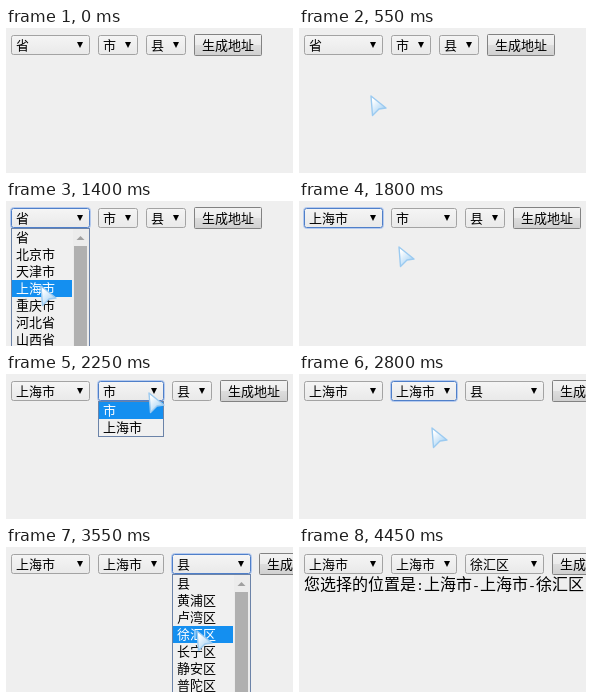
An HTML page for the animation above (4800 ms loop, 287 by 145 pixels).

```html
<!DOCTYPE html>
<html lang="zh-CN">
<head>
<meta charset="utf-8">
<style>
html, body { margin: 0; width: 100%; height: 100%; overflow: hidden; background: #efefef; }
svg { display: block; }
text { font: 13px "Noto Sans CJK SC", "Noto Sans CJK", sans-serif; }
.result { font-size: 16px; }
.half { font: 13.333px "Liberation Mono", monospace; }
</style>
</head>
<body>
<svg width="287" height="145" viewBox="0 0 287 145">
  <defs>
    <linearGradient id="field" x2="0" y2="1">
      <stop stop-color="#f5f5f5"/><stop offset="1" stop-color="#e9e9e9"/>
    </linearGradient>
    <linearGradient id="button" x2="0" y2="1">
      <stop stop-color="#f3f3f3"/><stop offset=".5" stop-color="#ebebeb"/>
      <stop offset=".5" stop-color="#dedede"/><stop offset="1" stop-color="#cfcfcf"/>
    </linearGradient>
    <linearGradient id="pointer" x2=".8" y2="1">
      <stop offset=".2" stop-color="#fff"/><stop offset="1" stop-color="#98cbf3"/>
    </linearGradient>
  </defs>
  <g id="scene"></g>
</svg>
<script>
const LOOP = 4800, STEP = 50, ROW = 17, LIST_TOP = 28;
const scene = document.getElementById('scene');

// Each menu: focus, opening and choosing times, narrow and wide widths.
const menus = [
  { focus: 800, open: 1000, pick: 1500, blur: 2100, narrow: 79, wide: 79, grow: 0, scroll: true, choice: 3,
    items: ['省', '北京市', '天津市', '上海市', '重庆市', '河北省', '山西省'] },
  { focus: 2100, open: 2150, pick: 2550, blur: 3200, narrow: 40, wide: 66, grow: 1500, choice: 1,
    items: ['市', '上海市'] },
  { focus: 3200, open: 3250, pick: 3700, blur: 4350, narrow: 40, wide: 79, grow: 2550, scroll: true, choice: 3,
    items: ['县', '黄浦区', '卢湾区', '徐汇区', '长宁区', '静安区', '普陀区'] }
];

// Pointer path: time, x, y
const path = [
  [50, 71, 103], [350, 71, 103], [800, 71, 16], [1000, 71, 16], [1400, 34, 84],
  [1500, 34, 86], [1600, 34, 86], [1950, 142, 18], [2250, 142, 18], [2500, 128, 55],
  [2750, 128, 55], [3150, 218, 14], [3300, 218, 14], [3550, 190, 83], [3650, 190, 88],
  [3850, 190, 88], [4150, 290, 18], [LOOP, 290, 18]
];

function pointerAt(t) {
  const i = path.findIndex(p => p[0] > t);
  if (i < 1) return null;
  const [t0, x0, y0] = path[i - 1], [t1, x1, y1] = path[i];
  const u = (t - t0) / (t1 - t0), k = u * u * (3 - 2 * u);
  return [Math.round(x0 + (x1 - x0) * k), Math.round(y0 + (y1 - y0) * k)];
}

const rect = (x, y, w, h, fill, more = '') =>
  `<rect x="${x}" y="${y}" width="${w}" height="${h}" fill="${fill}" ${more}/>`;
const frame = (x, y, w, h, fill, stroke, more = '') =>
  rect(x + .5, y + .5, w - 1, h - 1, fill, `stroke="${stroke}" ${more}`);
const label = (x, y, s, fill = '#000') => `<text x="${x}" y="${y}" fill="${fill}">${s}</text>`;

function field(m, x, w, t) {
  const focused = t >= m.focus && t < m.blur;
  const ring = focused ? frame(x - 1, 6, w + 2, 22, 'none', '#6d9bea', 'rx="3" opacity=".45"') : '';
  const a = x + w - 10;
  return ring + frame(x, 7, w, 20, 'url(#field)', focused ? '#4f7fc9' : '#a3a3a3', 'rx="2"') +
    label(x + 5, 22, m.items[t >= m.pick ? m.choice : 0]) +
    `<path d="M${a - 3} 14h6l-3 6z"/>`;
}

function list(m, x, w, pointer) {
  const n = m.items.length;
  const active = Math.max(0, Math.min(n - 1, Math.floor((pointer[1] - LIST_TOP) / ROW)));
  const inner = m.scroll ? w - 19 : w - 2;
  let s = frame(x, 27, w, m.scroll ? 200 : n * ROW + 2, '#f0f0f0', '#6b83a8');
  s += rect(x + 1, LIST_TOP + active * ROW, inner, ROW, '#148ff0');
  m.items.forEach((item, i) => {
    s += label(x + 5, 41 + i * ROW, item, i === active ? '#fff' : '#000');
  });
  if (m.scroll) {
    const b = x + w - 17;
    s += rect(b, 28, 16, 117, '#ececec') + rect(b + 1, 45, 13, 100, '#b0b0b0') +
      `<path d="M${b + 3.5} 39h8l-4-4z" fill="#a0a0a0"/>`;
  }
  return s;
}

function draw(t) {
  const pointer = pointerAt(t);
  let x = 5, fields = '', popup = '';
  for (const m of menus) {
    const w = t >= m.grow ? m.wide : m.narrow;
    fields += field(m, x, w, t);
    if (t >= m.open && t < m.pick) popup = list(m, x, w, pointer);
    x += w + 8;
  }
  const pressed = t >= 4350 && t < 4450;
  let s = fields + frame(x, 6, 68, 22, pressed ? '#d5d5d5' : 'url(#button)', '#828282', 'rx="1"') +
    label(x + 8, 22, '生成地址');
  if (t >= 4450) {
    const half = c => `<tspan class="half">${c}</tspan>`;
    const place = menus.map(m => m.items[m.choice]).join(half('-'));
    s += `<text class="result" x="5" y="43">您选择的位置是${half(':')}${place}</text>`;
  }
  s += popup;
  if (pointer) {
    s += `<path transform="translate(${pointer})" d="M1 1L16 13L9 14L2.5 20.5Z"
      fill="url(#pointer)" stroke="#9bcaf0" stroke-width="1.4" stroke-linejoin="round"/>`;
  }
  scene.innerHTML = s;
}

const start = performance.now();
let last = -1;
function tick() {
  const t = Math.floor((performance.now() - start) % LOOP / STEP) * STEP;
  if (t !== last) draw(last = t);
  requestAnimationFrame(tick);
}
tick();
</script>
</body>
</html>
```
